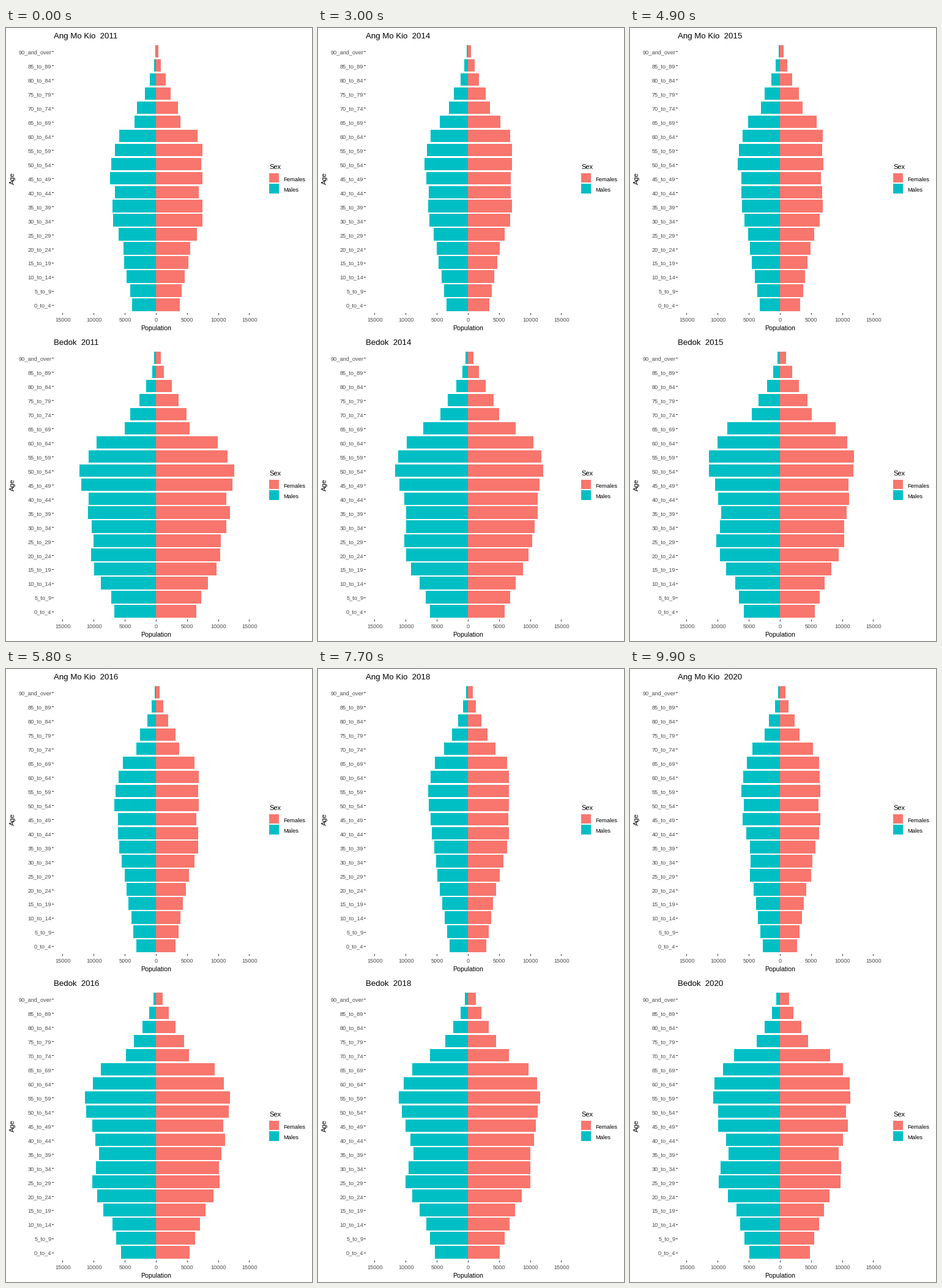
A matplotlib script that plays this animation: 500 by 1000 pixels, repeating every 10000 ms.

```python
import numpy as np
import matplotlib.pyplot as plt
from matplotlib.animation import FuncAnimation
from matplotlib.patches import Rectangle

W, H, DPI = 500, 1000, 100
FRAMES, INTERVAL, YEARS = 100, 100, 9
RED, TEAL = "#F8766D", "#00BFC4"
GREY, TICK = "#4D4D4D", "#333333"

ZERO = 245                         # x of the shared baseline
STEP = 22.95                       # row spacing
BAR_TOP, BAR_END = 28.5, 48.97     # edges of the top row
PANEL = 500                        # height of one chart

AGES = [f"{a}_to_{a + 4}" for a in range(0, 90, 5)] + ["90_and_over"]
GROUPS = np.arange(len(AGES))
BIRTHS = 0.87                      # each new five-year cohort vs. the last

# Share of a cohort still present after the nine years, by age group reached.
KEEP_AT = [2, 4, 5, 6, 7, 8, 9, 14, 15, 17, 18]
KEEP_M = [.93, .905, .96, .905, .80, .81, .89, .84, .755, .52, .40]
KEEP_F = [.935, .907, .97, .935, .87, .87, .91, .88, .837, .63, .63]

plt.rcParams["font.family"] = "Liberation Sans"
fig = plt.figure(figsize=(W / DPI, H / DPI), dpi=DPI, facecolor="white")
ax = fig.add_axes([0, 0, 1, 1])
ax.set_xlim(0, W)
ax.set_ylim(H, 0)
ax.axis("off")


def text(x, y, s, px, color="black", ha="left", **kw):
    return ax.text(x, y, s, fontsize=px * 72 / DPI, color=color, ha=ha,
                   va="baseline", **kw)


def rect(x, y, w, h, color):
    box = Rectangle((x, y), w, h, facecolor=color, linewidth=0,
                    antialiased=False)
    return ax.add_patch(box)


class Cohorts:
    """Ages a starting profile (bar lengths in px, youngest group first)."""

    def __init__(self, start, keep, stay):
        unborn = [start[0] * BIRTHS ** 2, start[0] * BIRTHS]
        self.profile = unborn + start
        self.keep = stay * np.interp(GROUPS, KEEP_AT, keep)

    def at(self, t):
        """Bar lengths t years after the start."""
        came_from = GROUPS - t / 5
        size = np.interp(came_from, np.arange(-2, len(AGES)), self.profile)
        return np.rint(size * self.keep ** (t / YEARS))


class Pyramid:
    def __init__(self, name, top, males, females, stay):
        self.name = name
        self.males = Cohorts(males, KEEP_M, stay)
        self.females = Cohorts(females, KEEP_F, stay)
        self.title = text(78, top + 17, "", 13.2)
        self.bars = [self.row(top, age, i)
                     for i, age in enumerate(reversed(AGES))][::-1]
        for k in range(-3, 4):
            x = ZERO + 0.4 + k * 50.83
            rect(int(x), top + 465, 1, 3, TICK)
            text(x, top + 479, str(abs(k) * 5000), 9.2, GREY, "center")
        text(244.8, top + 493, "Population", 10.5, ha="center")
        text(14, top + 245.5, "Age", 11, ha="center", rotation=90,
             rotation_mode="anchor")
        self.legend(top)

    def row(self, top, age, i):
        y0 = top + int(BAR_TOP + i * STEP)
        y1 = top + int(BAR_END + i * STEP)
        mid = top + 38.6 + i * STEP
        text(74.5, round(mid + 3.6), age, 9.3, GREY, "right")
        rect(75, round(mid - 0.2), 3, 1, TICK)
        return [rect(ZERO, y0, 0, y1 - y0, c) for c in (TEAL, RED)]

    def legend(self, top):
        text(430, top + 230, "Sex", 11)
        rect(430, top + 237, 16, 15, RED)
        rect(430, top + 254, 16, 16, TEAL)
        text(453, top + 250, "Females", 9.4)
        text(453, top + 267, "Males", 9.4)

    def draw(self, t):
        self.title.set_text(f"{self.name}  {2011 + round(t)}")
        rows = zip(self.bars, self.males.at(t), self.females.at(t))
        for (left, right), m, f in rows:
            left.set_x(ZERO - m)
            left.set_width(m)
            right.set_width(f)


charts = [
    Pyramid("Ang Mo Kio", 0,
            [39, 42, 48, 52, 53, 61, 70, 71, 67, 75,
             73, 67, 60, 35, 31, 18, 10, 3, 1],
            [39, 42, 47, 53, 56, 67, 76, 76, 70, 76,
             74, 76, 68, 40, 36, 24, 16, 8, 4], stay=0.975),
    Pyramid("Bedok", PANEL,
            [68, 73, 90, 101, 106, 102, 105, 111, 110, 122,
             125, 110, 97, 51, 42, 27, 16, 6, 3],
            [66, 74, 85, 99, 105, 106, 115, 121, 115, 125,
             128, 117, 101, 55, 50, 37, 26, 13, 8], stay=1.02),
]


def update(i):
    for chart in charts:
        chart.draw(YEARS * i / (FRAMES - 1))
    return []


anim = FuncAnimation(fig, update, frames=FRAMES, interval=INTERVAL,
                     init_func=lambda: update(0), repeat=True, repeat_delay=0)
plt.show()
```
